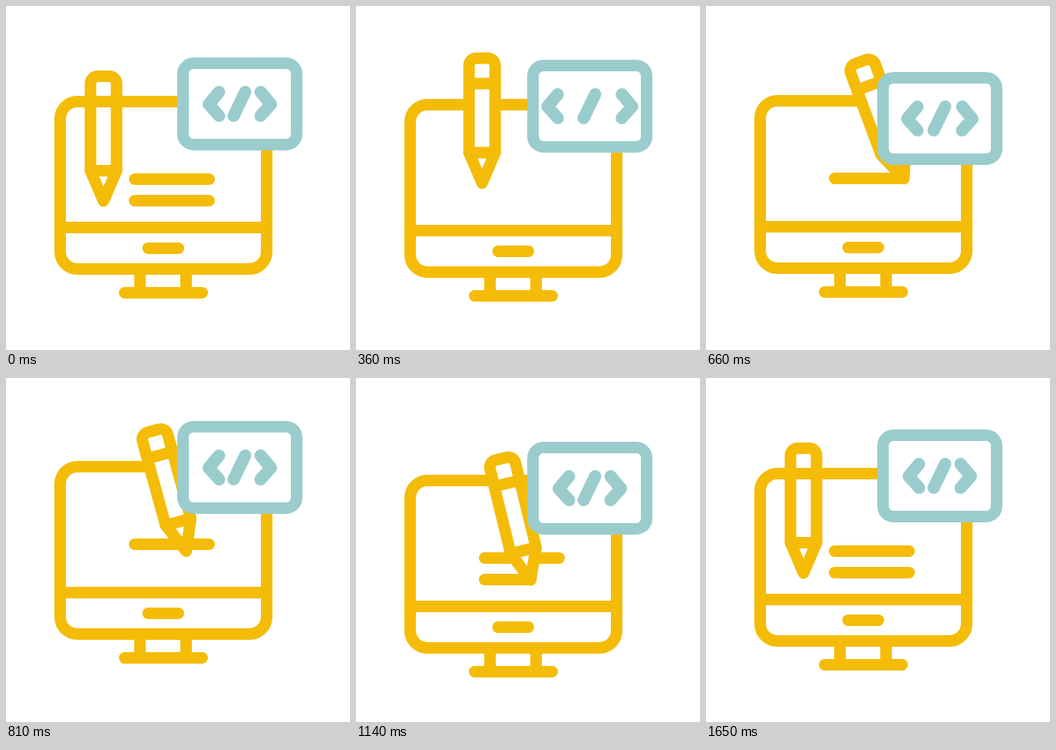
These frames come from a looping animation (448 px wide and 448 px high, 1710 ms). An HTML page with a canvas:

```html
<!DOCTYPE html>
<html lang="en">
<head>
<meta charset="utf-8">
<title>Web design icon</title>
<style>
html, body { margin: 0; width: 100%; height: 100%; overflow: hidden; background: #fff; }
canvas { display: block; width: 448px; height: 448px; }
</style>
</head>
<body>
<canvas id="stage" width="448" height="448"></canvas>
<script>
const ctx = document.getElementById('stage').getContext('2d');
const LOOP = 1710, STEP = 30;
const YELLOW = '#f4bc07', TEAL = '#9bcccd';

// Smooth progress from 0 to 1 between two times.
function ease(t, from, to) {
  const u = Math.min(1, Math.max(0, (t - from) / (to - from)));
  return u * u * (3 - 2 * u);
}

// Down, up, down again and back to rest, in units of the amplitude.
function swing(t, start, low, high, lowAgain, end) {
  return ease(t, start, low) - 2 * ease(t, low, high)
    + 2 * ease(t, high, lowAgain) - ease(t, lowAgain, end);
}

function line(x1, y1, x2, y2) {
  ctx.beginPath();
  ctx.moveTo(x1, y1);
  ctx.lineTo(x2, y2);
  ctx.stroke();
}

function panel(x, y, w, h, r) {
  ctx.beginPath();
  ctx.roundRect(x, y, w, h, r);
  ctx.fill();
  ctx.stroke();
}

function setPen(color, width) {
  ctx.strokeStyle = color;
  ctx.lineWidth = width;
}

// Runs a drawing in its own coordinate system.
function placed(x, y, angle, drawing) {
  ctx.save();
  ctx.translate(x, y);
  ctx.rotate(angle);
  drawing();
  ctx.restore();
}

function textLine(y, progress) {
  if (progress > 0) line(167.5, y, 167.5 + 97 * progress, y);
}

function drawMonitor() {
  panel(70.5, 124.5, 269, 218, 22.5);
  line(70.5, 288.5, 339.5, 288.5);
  line(185, 315.5, 224.5, 315.5);
  line(174.5, 345, 174.5, 372);
  line(234.5, 345, 234.5, 372);
  line(154.5, 373.5, 255.5, 373.5);
}

// The origin is the pencil's writing point.
function drawPencil() {
  const half = 17, top = -162.5, neck = -39.5, round = 9.5;
  ctx.beginPath();
  ctx.moveTo(0, 0);
  ctx.lineTo(-half, neck);
  ctx.arcTo(-half, top, 0, top, round);
  ctx.arcTo(half, top, half, neck, round);
  ctx.lineTo(half, neck);
  ctx.closePath();
  ctx.fill();
  ctx.stroke();
  for (const y of [top + 33, neck]) line(-half, y, half, y);
}

// side is -1 for "<" and 1 for ">".
function chevron(x, side) {
  ctx.beginPath();
  ctx.moveTo(x, 112);
  ctx.lineTo(x + 13.5 * side, 128);
  ctx.lineTo(x, 143);
  ctx.stroke();
}

function drawCard(spread) {
  setPen(TEAL, 15);
  panel(230.5, 74.5, 148, 106, 13.5);
  setPen(TEAL, 16);
  chevron(277.5 - spread, -1);
  line(311.5, 112, 296.5, 143);
  chevron(331.5 + spread, 1);
}

function draw(t) {
  const clear = ease(t, 45, 285);
  const approach = ease(t, 45, 390);
  const write1 = ease(t, 380, 715);
  const back = ease(t, 715, 975);
  const write2 = ease(t, 965, 1265);
  const home = ease(t, 1295, 1650);
  const reach = write1 - back + write2 - home;

  const tipX = 127 + 38 * (approach - home) + 100 * reach;
  const tipY = 254 - 28 * (approach - back);
  const tilt = -22 * reach * Math.PI / 180;
  const monitorY = Math.round(9 * swing(t, 240, 485, 810, 1130, 1370));
  const cardY = Math.round(20 * swing(t, 275, 640, 885, 1200, 1380));
  const spread = 15 * (ease(t, 45, 390) - ease(t, 390, 740));

  ctx.fillStyle = '#fff';
  ctx.fillRect(0, 0, 448, 448);
  ctx.lineCap = ctx.lineJoin = 'round';

  placed(0, monitorY, 0, () => {
    setPen(YELLOW, 15);
    drawMonitor();
    textLine(225.5, 1 - clear + write1);
    textLine(253.5, 1 - clear + write2);
    placed(tipX, tipY, tilt, drawPencil);
  });
  placed(0, cardY, 0, () => drawCard(spread));
}

const start = performance.now();
function tick() {
  const t = (performance.now() - start) % LOOP;
  draw(Math.floor(t / STEP) * STEP);
  requestAnimationFrame(tick);
}
tick();
</script>
</body>
</html>
```
